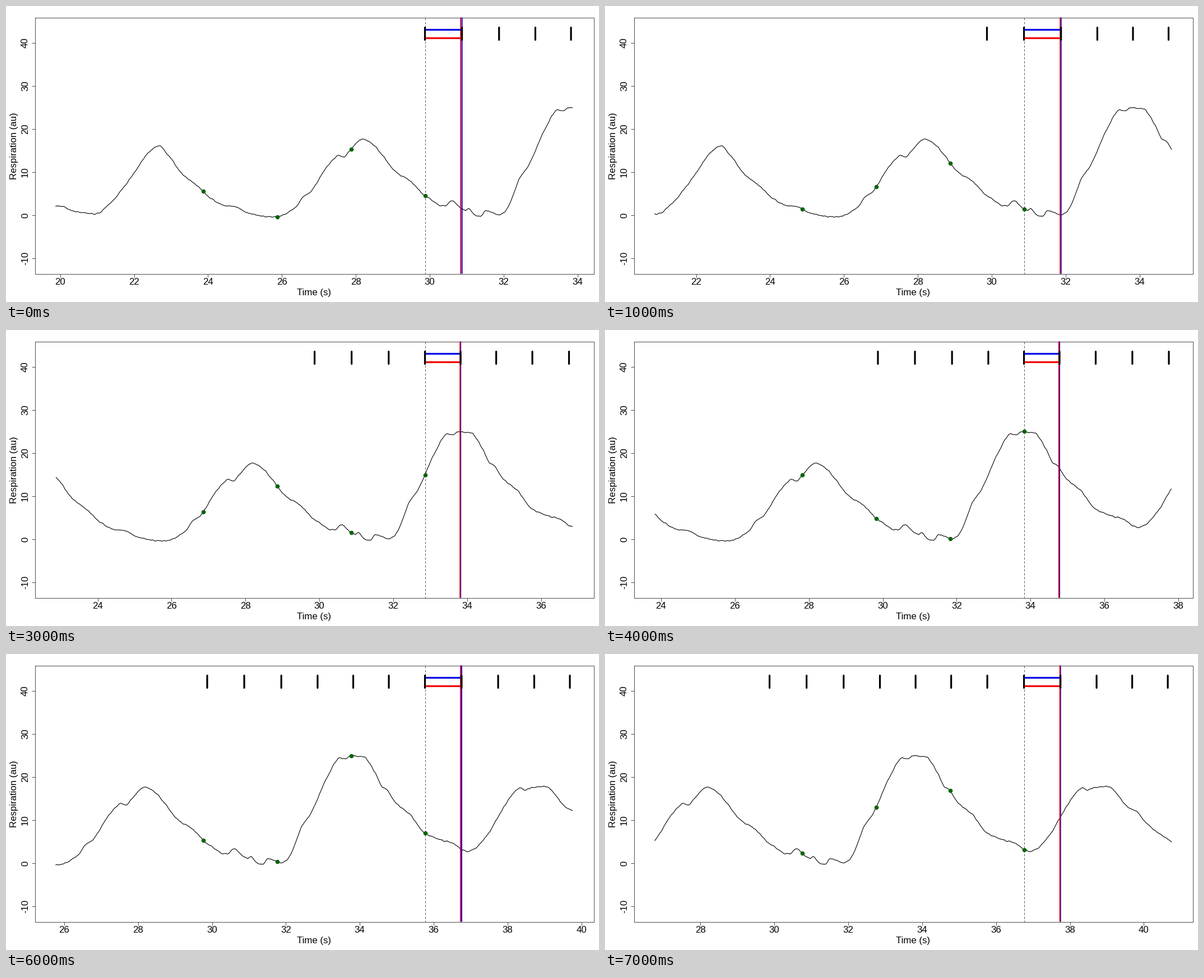
A matplotlib script that plays this animation: 1058 px wide and 529 px high, repeating every 8000 ms.

```python
import numpy as np
import matplotlib.pyplot as plt
from matplotlib.animation import FuncAnimation

W, H, DPI = 1058, 529, 100
PT = 72 / DPI                       # points per pixel
LEFT, RIGHT, TOP, BOTTOM = 51, 1048, 20, 478
NOW_X, PX_PER_S = 747, 65.93
ZERO_Y, PX_PER_AU = 373.5, 7.71
FONT = dict(family="Liberation Sans", size=16.7 * PT, color="black")

BEATS = np.array([29.87, 30.872, 31.875, 32.857, 33.822, 34.785,
                  35.763, 36.755, 37.743, 38.72, 39.684, 40.647])
# gap in pixels between the predicted and the real next beat
GAPS = [2.4, 1.5, 0.2, 1.0, 1.3, 2.0, 2.0, 1.0]

# turning points of the respiration signal as (time, value)
KNOTS = [
    (20.06, 2.1), (20.3, 1.1), (20.95, .35), (21.34, 2.66), (22, 9.8),
    (22.36, 14.2), (22.67, 16.1), (22.94, 13.7), (23.31, 9.5), (23.83, 5.9),
    (24, 4.35), (24.45, 2.3), (24.76, 1.95), (25.01, .7), (25.86, -.35),
    (26.06, .2), (26.41, 2.3), (26.56, 4.3), (26.73, 5.06), (27.24, 11.5),
    (27.56, 13.8), (27.66, 13.5), (27.85, 15.2), (28.18, 17.65),
    (28.38, 16.9), (29.2, 9.3), (29.34, 8.8), (29.87, 4.6), (30.41, 2.1),
    (30.6, 3.45), (30.74, 2.4), (30.95, 1.2), (31.05, 1.55), (31.2, .2),
    (31.37, -.28), (31.53, 1.1), (31.88, .13), (32.04, .9), (32.46, 8.95),
    (32.64, 11.1), (33.17, 20.9), (33.46, 24.4), (33.6, 24.2),
    (33.75, 24.9), (34.1, 24.65), (34.4, 21.2), (34.6, 17.8), (34.75, 17),
    (34.9, 14.7), (35.35, 11.4), (35.76, 6.95), (36.54, 4.47),
    (36.87, 2.75), (37.08, 3.3), (37.48, 6.9), (37.74, 10.8),
    (38.36, 17.4), (38.48, 16.85), (38.59, 17.4), (39.03, 17.75),
    (39.6, 12.8), (39.79, 12.1), (40.06, 9.4), (40.85, 4.3),
]


def monotone_cubic(x, y, t):
    """Cubic Hermite curve through the knots without overshoot."""
    h = np.diff(x)
    s = np.diff(y) / h
    m = np.zeros_like(y)
    m[-1] = s[-1]
    for k in range(1, len(x) - 1):
        if s[k - 1] * s[k] > 0:
            a, b = 2 * h[k] + h[k - 1], h[k] + 2 * h[k - 1]
            m[k] = (a + b) / (a / s[k - 1] + b / s[k])
    t = np.clip(t, x[0], x[-1])
    k = np.clip(np.searchsorted(x, t) - 1, 0, len(h) - 1)
    u = (t - x[k]) / h[k]
    return ((1 + 2 * u) * (1 - u) ** 2 * y[k] + u * u * (3 - 2 * u) * y[k + 1]
            + h[k] * u * (1 - u) * ((1 - u) * m[k] - u * m[k + 1]))


def respiration():
    """Breathing signal with small sensor jitter."""
    t = np.arange(19.75, 40.85, 0.015)
    x, y = np.array(KNOTS, dtype=float).T
    noise = np.random.default_rng(4).normal(0, 0.15, t.size)
    jitter = np.convolve(noise, np.ones(5) / 5, mode="same")
    return t, monotone_cubic(x, y, t) + jitter


def to_y(value):
    return ZERO_Y - PX_PER_AU * value


TIME, VALUE = respiration()

fig = plt.figure(figsize=(W / DPI, H / DPI), dpi=DPI, facecolor="white")
ax = fig.add_axes([0, 0, 1, 1])
ax.set_xlim(-0.5, W - 0.5)
ax.set_ylim(H - 0.5, -0.5)
ax.axis("off")


def line(xs, ys, color, width, z, cap="butt", **kw):
    return ax.plot(xs, ys, color=color, lw=width * PT, zorder=z,
                   solid_capstyle=cap, **kw)[0]


def label(x, y, text, rotation=0):
    return ax.text(x, y, text, rotation=rotation, rotation_mode="anchor",
                   ha="center", va="baseline", **FONT)


# fixed frame and value axis
AXIS = "#3a3a3a"
line([LEFT, RIGHT, RIGHT, LEFT, LEFT], [TOP, TOP, BOTTOM, BOTTOM, TOP],
     AXIS, 0.9, 1, "projecting")
for au in range(-10, 41, 10):
    line([LEFT - 6, LEFT], [to_y(au)] * 2, AXIS, 0.9, 1)
    label(38.5, to_y(au), str(au), 90)
label(549, 517, "Time (s)")
label(18.5, 249.5, "Respiration (au)", 90)

# moving parts
now = line([NOW_X] * 2, [TOP, BOTTOM], "#555555", 1, 2)
now.set_dashes([4, 3])
curve = line([], [], "black", 1.1, 3)
dots = line([], [], "#006400", 0, 7, marker="o", ms=7.6 * PT, mew=0)
blue_bar = line([], [], "#0000e6", 3.2, 5)
red_bar = line([], [], "#f00000", 3.2, 5)
blue_line = line([], [], "#0000e0", 2, 4, snap=False)
red_line = line([], [], "#f00010", 1.9, 4.5, snap=False)
beat_marks = [line([], [], "black", 3.2, 6, "round", snap=False)
              for _ in BEATS]
time_ticks = [(line([], [], AXIS, 0.9, 1), label(0, 497, ""))
              for _ in range(8)]


def draw(i):
    t = BEATS[i]

    def to_x(time):
        return NOW_X + (time - t) * PX_PER_S

    seen = (TIME >= t - 10) & (TIME <= t + 4)
    curve.set_data(to_x(TIME[seen]), to_y(VALUE[seen]))

    lags = t - np.arange(0, 8, 2)
    dots.set_data(to_x(lags), to_y(np.interp(lags, TIME, VALUE)))

    real = to_x(BEATS[i + 1])
    guess = real - GAPS[i]
    blue_bar.set_data([NOW_X, real], [41, 41])
    red_bar.set_data([NOW_X, guess], [56.5, 56.5])
    blue_line.set_data([real] * 2, [TOP, BOTTOM])
    red_line.set_data([guess] * 2, [TOP, BOTTOM])

    for mark, beat in zip(beat_marks, BEATS):
        mark.set_data([to_x(beat)] * 2, [38, 60])
        mark.set_visible(beat <= t + 4)

    first = 2 * int(np.ceil((t + (LEFT - NOW_X) / PX_PER_S) / 2))
    for k, (tick, text) in enumerate(time_ticks):
        second = first + 2 * k
        x = to_x(second)
        tick.set_data([x, x], [BOTTOM, BOTTOM + 6])
        text.set_x(x)
        text.set_text(str(second))
        for part in (tick, text):
            part.set_visible(x <= RIGHT)
    return []


anim = FuncAnimation(fig, draw, frames=8, interval=1000, repeat=True,
                     repeat_delay=0, blit=False)
plt.show()
```
